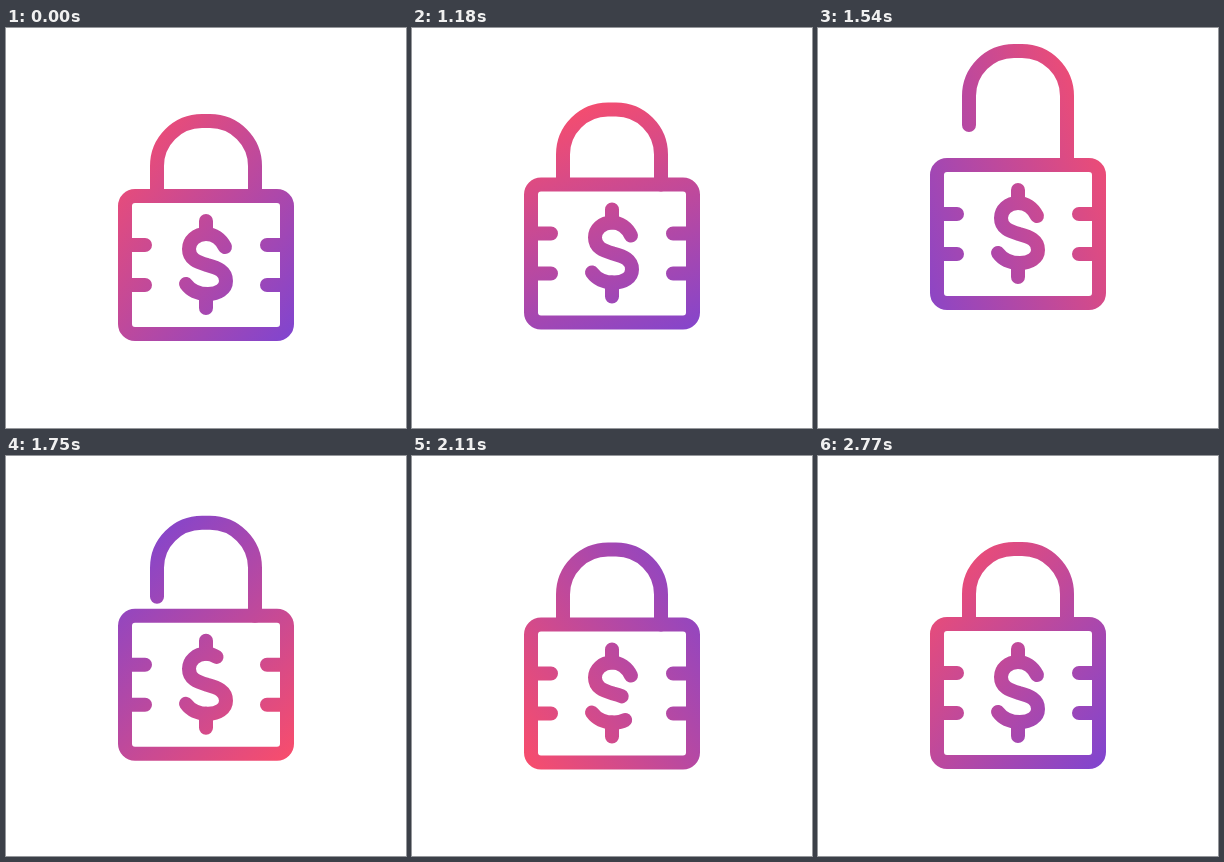
These frames come from a looping animation (400x400 px, 2890 ms). An HTML page:

```html
<!DOCTYPE html>
<html>
<head>
<meta charset="utf-8">
<style>
html, body { margin: 0; height: 100%; overflow: hidden; background: #fff; }
svg { display: block; width: 100vw; height: 100vh; }
</style>
</head>
<body>
<svg viewBox="0 0 400 400">
  <defs>
    <linearGradient id="tint" gradientUnits="userSpaceOnUse" x1="330" y1="200" x2="70" y2="200">
      <stop stop-color="#f74d6d"/>
      <stop offset="1" stop-color="#8345cd"/>
    </linearGradient>
    <mask id="icon" maskUnits="userSpaceOnUse" x="0" y="0" width="400" height="400">
      <g id="lock" fill="none" stroke="#fff" stroke-width="14" stroke-linecap="round">
        <rect x="119" y="168" width="162" height="138" rx="10"/>
        <path id="shackle"/>
        <path d="M119 217h20M119 257h20M281 217h-20M281 257h-20M200 193v13M200 266v14"/>
        <path id="oldS" class="s"/>
        <path id="newS" class="s"/>
      </g>
    </mask>
  </defs>
  <rect width="400" height="400" fill="url(#tint)" mask="url(#icon)"/>
</svg>
<script>
const LOOP = 2890, STEP = 30;
const CURVE = 'M219 219C215 211 208 206 200 206C190 206 183 213 183 221C183 231 191 234 201 237' +
  'C212 240 220 243 220 253C220 261 212 266 202 266C192 266 185 263 180 256';

// Keys are [time in ms, value]
const bodyKeys = [[1000, 0], [1090, 13], [1260, -32], [1500, -31], [1540, -31], [1950, 13], [2180, -3], [2480, 0]];
const shackleKeys = [[1200, 0], [1500, -39.5], [1550, -39], [1960, 4.5], [2080, 0]];

const $ = id => document.getElementById(id);
const lock = $('lock'), shackle = $('shackle'), oldS = $('oldS'), newS = $('newS'), tint = $('tint');
for (const path of [oldS, newS]) {
  path.setAttribute('d', CURVE);
  path.setAttribute('pathLength', 1);
}

const span = (t, from, to) => Math.min(1, Math.max(0, (t - from) / (to - from)));
const smooth = u => u * u * (3 - 2 * u);

function along(keys, t) {
  let value = keys[0][1];
  for (let i = 1; i < keys.length; i++) {
    const [from, a] = keys[i - 1], [to, b] = keys[i];
    value += (b - a) * smooth(span(t, from, to));
  }
  return value;
}

function draw(t) {
  lock.setAttribute('transform', `translate(0 ${along(bodyKeys, t)})`);

  const lift = along(shackleKeys, t);
  shackle.setAttribute('d',
    `M151 ${167 + Math.min(0, lift)}V${138 + lift}a45 45 0 0 1 45 -45h8a45 45 0 0 1 45 45V168`);

  const turn = span(t, 1000, 2460);
  tint.setAttribute('gradientTransform', `rotate(${218 + 180 * (turn + smooth(turn))} 200 200)`);

  // The dollar curve is wiped away from its start and redrawn behind the gap
  const wiped = smooth(span(t, 1620, 2340));
  const drawn = 0.85 * smooth(span(t, 1790, 2320)) + 0.15 * span(t, 2320, 2770) ** 2;
  oldS.style.display = wiped < 1 ? '' : 'none';
  oldS.setAttribute('stroke-dasharray', '1.1 2');
  oldS.setAttribute('stroke-dashoffset', -wiped);
  newS.style.display = drawn > 0 ? '' : 'none';
  newS.setAttribute('stroke-dasharray', drawn < 1 ? `${drawn} 2` : 'none');
}

const start = performance.now();
function tick() {
  const t = (performance.now() - start) % LOOP;
  draw(t - (t + STEP - 10) % STEP);
  requestAnimationFrame(tick);
}
tick();
</script>
</body>
</html>
```
